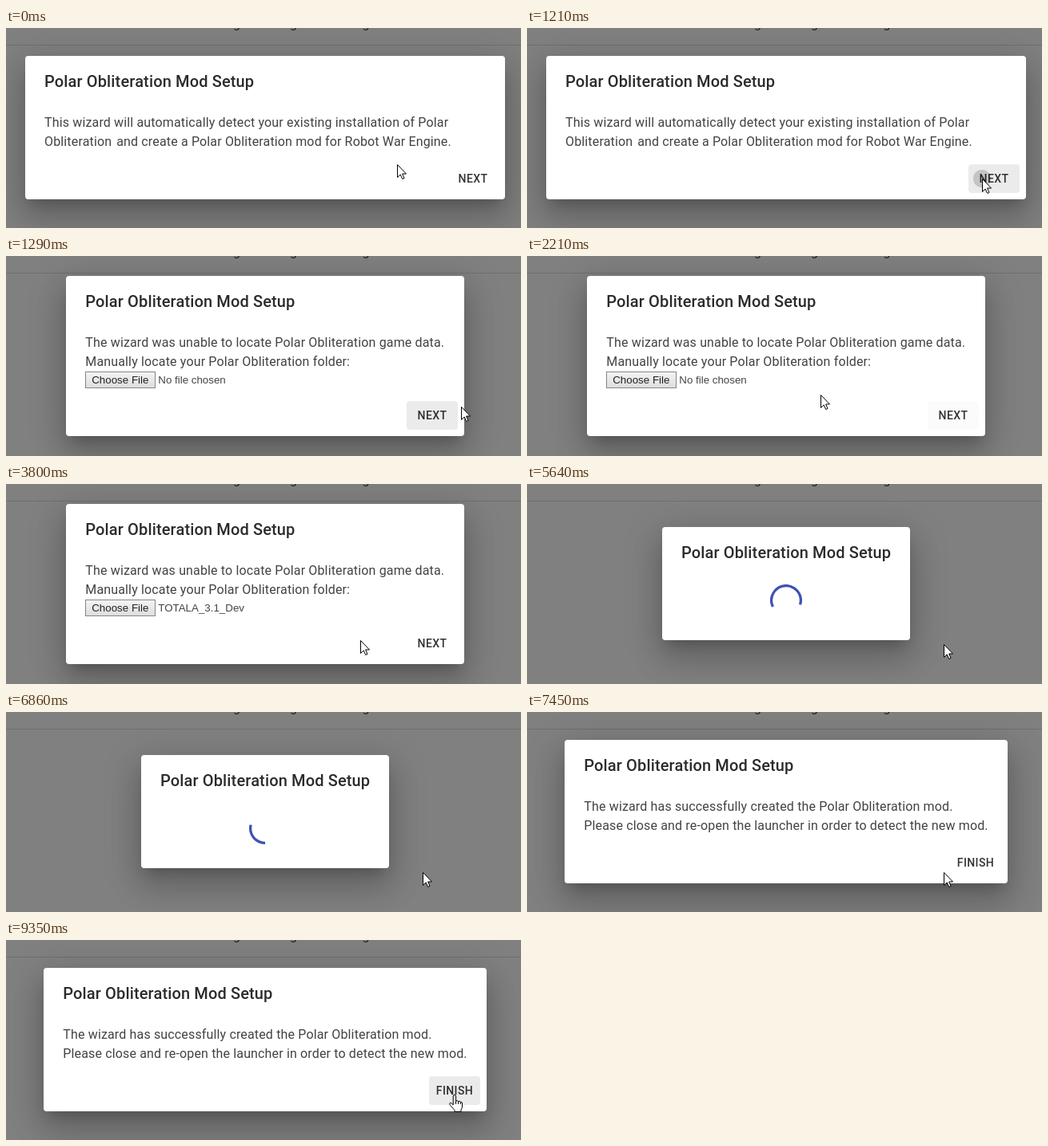
An HTML page that plays this animation: 644 by 251 pixels, repeating every 9630 ms.

```html
<!DOCTYPE html>
<html lang="en">
<head>
<meta charset="utf-8">
<title>Mod setup wizard</title>
<style>
html, body { margin: 0; width: 100%; height: 100%; overflow: hidden; background: #808080; }
body { position: relative; font: 16px/24px Roboto, sans-serif; letter-spacing: .00938em; color: rgba(0,0,0,.74); }
body * { position: absolute; white-space: nowrap; }
.rule { left: 0; top: 21px; width: 100%; height: 1px; background: #707070; }
.page { top: -17.5px; color: #222; }
section {
  background: #fff; border-radius: 4px; visibility: hidden;
  box-shadow: 0 11px 15px -7px rgba(0,0,0,.2), 0 24px 38px 3px rgba(0,0,0,.14), 0 9px 46px 8px rgba(0,0,0,.12);
}
h2 { margin: 0; left: 24px; top: 16px; font: 500 20px/32px Roboto, sans-serif; letter-spacing: .0065em; color: rgba(0,0,0,.83); }
p { margin: 0; left: 24px; top: 72px; }
p span { position: static; margin-left: 1.9px; }
.button {
  right: 8px; bottom: 8px; width: 64px; height: 36px; border-radius: 4px; overflow: hidden; color: rgba(0,0,0,.8);
  font: 500 14px/36px Roboto, sans-serif; letter-spacing: .02857em; text-align: center;
}
.ripple { border-radius: 50%; background: rgba(0,0,0,.17); }
.file { left: 24px; top: 120px; font: 13.333px/21px "Liberation Sans", Arial, sans-serif; letter-spacing: 0; color: #222; }
.choose {
  box-sizing: border-box; width: 88px; height: 21px; line-height: 19px; text-align: center; text-indent: -1px;
  border: 1px solid #868686; background: linear-gradient(#f3f3f3, #dedede);
}
.choose.hot { border-color: #5c5c5c; background: #efefef; }
#fileName { left: 91px; color: #444; }
#spinner { left: 135px; top: 72px; }
#spinner circle { fill: none; stroke: #3f51b5; stroke-width: 3.6; }
#cursor { left: 0; top: 0; overflow: visible; }
#cursor path { fill: #fff; stroke: #000; stroke-linejoin: round; }
</style>
</head>
<body>
<div class="page" style="left:284px">g</div>
<div class="page" style="left:355px">g</div>
<div class="page" style="left:445.5px">g</div>
<div class="rule"></div>

<section style="left:24px;top:35px;width:600px;height:180px">
  <h2>Polar Obliteration Mod Setup</h2>
  <p>This wizard will automatically detect your existing installation of Polar<br>Obliteration <span>and create a Polar Obliteration mod for Robot War Engine.</span></p>
  <div class="button"><div class="ripple"></div>NEXT</div>
</section>

<section style="left:75.3px;top:25px;width:497.7px;height:201px">
  <h2>Polar Obliteration Mod Setup</h2>
  <p>The wizard was unable to locate Polar Obliteration game data.<br>Manually locate your Polar Obliteration folder:</p>
  <div class="file"><div class="choose">Choose File</div><div id="fileName"></div></div>
  <div class="button"><div class="ripple"></div>NEXT</div>
</section>

<section style="left:169px;top:54px;width:310px;height:142px">
  <h2>Polar Obliteration Mod Setup</h2>
  <svg id="spinner" width="40" height="40" viewBox="22 22 44 44"><circle cx="44" cy="44" r="20.2"/></svg>
</section>

<section style="left:47.3px;top:35px;width:553.7px;height:180px">
  <h2>Polar Obliteration Mod Setup</h2>
  <p>The wizard has successfully created the Polar Obliteration mod.<br>Please close and re-open the launcher in order to detect the new mod.</p>
  <div class="button"><div class="ripple"></div>FINISH</div>
</section>

<svg id="cursor" width="20" height="24">
  <path id="arrow" d="M.5.5V16.5L4.2 13 6.7 18.5 9 17.5 6.6 12H11.5Z"/>
  <path id="hand" d="M-.8 13V2a1.7 1.7 0 0 1 3.4 0V8Q4.2 7 5.6 8.5 7.3 7.7 8.4 9.3 10.5 8.9 10.5 11V15Q10.5 17 9 19V21.5H1V19.5L-4.5 13.5Q-6 11.2-4.7 10.4-3.2 9.7-.8 13M2.6 8V12M5.6 8.5V12M8.4 9.3V12"/>
</svg>

<script>
const LOOP = 9630;
const $ = s => document.querySelector(s);
const dialogs = [...document.querySelectorAll('section')];
const clamp = p => Math.min(1, Math.max(0, p));
const within = (t, spans) => spans.some(([a, b]) => t >= a && t < b);

// cubic-bezier(x1, 0, x2, 1), solved by bisection
const bezier = (x1, x2) => p => {
  let lo = 0, hi = 1, s = .5;
  for (let i = 0; i < 24; i++) {
    s = (lo + hi) / 2;
    const x = 3 * (1 - s) ** 2 * s * x1 + 3 * (1 - s) * s * s * x2 + s ** 3;
    if (x < p) lo = s; else hi = s;
  }
  return s * s * (3 - 2 * s);
};
const standard = bezier(.4, .2), inOut = bezier(.42, .58);
const smooth = p => p * p * (3 - 2 * p);
const accelerate = p => p ** 1.6;
const slowDown = p => 1 - (1 - p) ** 1.7;

// time, x, y, easing towards this point
const path = [
  [0, 489, 171], [230, 489, 171], [780, 569, 189, smooth],
  [1850, 569, 189], [2210, 368, 174, accelerate], [2780, 180, 166, slowDown], [3190, 158, 159, slowDown],
  [3489, 158, 159], [3490, 450, 226], [3620, 443, 201, slowDown],
  [3770, 443, 201], [3800, 443, 196], [4180, 443, 196], [4590, 521, 201, smooth],
  [8890, 521, 201], [9350, 560, 194, smooth], [LOOP, 560, 194]
];
const starts = [0, 1260, 5170, 7450];
const pointing = [[607, 1110], [1870, 2060], [4450, 5100], [9020, LOOP]];
const hovers = [[607, 2080], [4450, 5170], [9020, LOOP]];
const presses = [[1080, 1260, 17, 18], [5080, 5170, 20, 19]];

function cursorAt(t) {
  const i = Math.max(1, path.findIndex(k => k[0] >= t));
  const [t0, x0, y0] = path[i - 1], [t1, x1, y1, ease = p => p] = path[i];
  const p = ease(clamp((t - t0) / (t1 - t0)));
  return [x0 + (x1 - x0) * p, y0 + (y1 - y0) * p];
}

function drawButton(button, t) {
  const fade = from => standard(clamp((t - from) / 250));
  const shade = hovers.reduce((sum, [on, off]) => sum + fade(on) - fade(off), 0);
  button.style.background = `rgba(0,0,0,${.08 * clamp(shade)})`;
  const ripple = button.firstChild;
  const press = presses.find(([a, b]) => t >= a && t < b);
  ripple.style.display = press ? 'block' : 'none';
  if (press) {
    const [from, , x, y] = press;
    const r = 51 * standard(clamp((t - from) / 550));
    ripple.style.cssText = `left:${x - r}px;top:${y - r}px;width:${2 * r}px;height:${2 * r}px`;
  }
}

function drawSpinner(t) {
  const u = t / 1400 % 1;
  const grow = inOut(clamp(2 * u)), run = inOut(clamp(2 * u - 1));
  const circle = $('#spinner circle');
  circle.setAttribute('stroke-dasharray', `${1 + 99 * grow} 200`);
  circle.setAttribute('stroke-dashoffset', -15 * grow - 110 * run);
  circle.setAttribute('transform', `rotate(${360 * u} 44 44)`);
}

function draw(now) {
  const t = now % LOOP;
  const current = starts.filter(s => s <= t).length - 1;
  dialogs.forEach((d, i) => d.style.visibility = i === current ? 'visible' : 'hidden');
  const button = dialogs[current].querySelector('.button');
  if (button) drawButton(button, t);
  if (current === 2) drawSpinner(t - starts[2]);

  $('#fileName').textContent = t < 3340 ? 'No file chosen' : 'TOTALA_3.1_Dev';
  $('.choose').classList.toggle('hot', t >= 2830 && t < 3340);

  const [x, y] = cursorAt(t), hand = within(t, pointing);
  $('#cursor').style.transform = `translate(${Math.round(x)}px,${Math.round(y)}px)`;
  $('#cursor').style.display = within(t, [[3340, 3490]]) ? 'none' : 'block';
  $('#hand').style.display = hand ? 'inline' : 'none';
  $('#arrow').style.display = hand ? 'none' : 'inline';
}

const begin = performance.now();
(function tick() {
  draw(performance.now() - begin);
  requestAnimationFrame(tick);
})();
</script>
</body>
</html>
```
